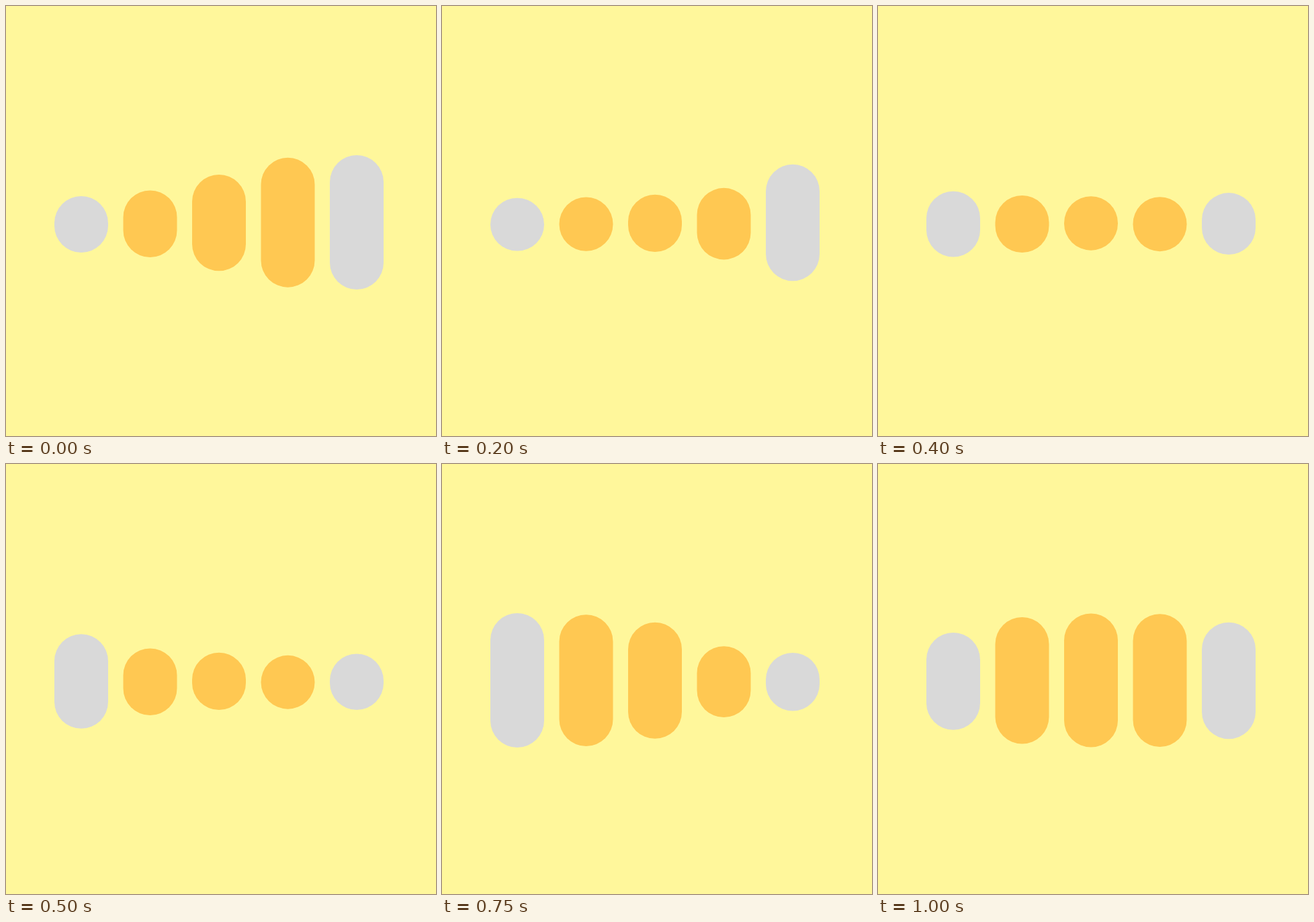
These frames come from a looping animation (640 by 640 pixels, 1050 ms). An HTML page with a canvas:

```html
<!DOCTYPE html>
<html lang="en">
<head>
<meta charset="utf-8">
<title>Pulsing bars</title>
<style>
  html, body { margin: 0; width: 100%; height: 100%; overflow: hidden; background: #fff79b; }
  canvas { display: block; width: 640px; height: 640px; }
</style>
</head>
<body>
<canvas id="stage" width="640" height="640"></canvas>
<script>
const ctx = document.getElementById("stage").getContext("2d");

const LOOP = 1050;   // the cycle is cut short, so the bars jump at the seam
const STEP = 50;
const CYCLE = 1200;
const HALF = CYCLE / 2;
const TALL = { top: 222, bottom: 422 };
const GREY = "#d9d9d9";
const ORANGE = "#ffc852";

// peak: time of full height; top and bottom: edges when shortest
const bars = [
  { peak: 753, top: 285.9, bottom: 364.4, color: GREY },
  { peak: 850, top: 284.7, bottom: 364.6, color: ORANGE },
  { peak: 950, top: 283.4, bottom: 363.4, color: ORANGE },
  { peak: 1076, top: 284.9, bottom: 364.6, color: ORANGE },
  { peak: 1200, top: 283.6, bottom: 365, color: GREY }
];

const lerp = (a, b, k) => a + (b - a) * k;

// cubic-bezier(.6, 0, .2, 1)
function ease(x) {
  let lo = 0, hi = 1;
  for (let i = 0; i < 24; i++) {
    const s = (lo + hi) / 2, r = 1 - s;
    const bx = 1.8 * s * r * r + 0.6 * s * s * r + s * s * s;
    if (bx < x) lo = s; else hi = s;
  }
  return lo * lo * (3 - 2 * lo);
}

function drawBar(bar, i, t) {
  const gap = Math.abs(t - bar.peak) % CYCLE;
  const k = ease(Math.min(gap, CYCLE - gap) / HALF);
  const top = lerp(TALL.top, bar.top, k);
  const bottom = lerp(TALL.bottom, bar.bottom, k);
  ctx.fillStyle = bar.color;
  ctx.beginPath();
  ctx.roundRect(72 + 102.5 * i, top, 80, bottom - top, 40);
  ctx.fill();
}

function draw(t) {
  ctx.fillStyle = "#fff79b";
  ctx.fillRect(0, 0, 640, 640);
  bars.forEach((bar, i) => drawBar(bar, i, t));
}

const start = performance.now();

function frame() {
  const t = (performance.now() - start + 1) % LOOP;
  draw(Math.floor(t / STEP) * STEP);
  requestAnimationFrame(frame);
}

frame();
</script>
</body>
</html>
```
